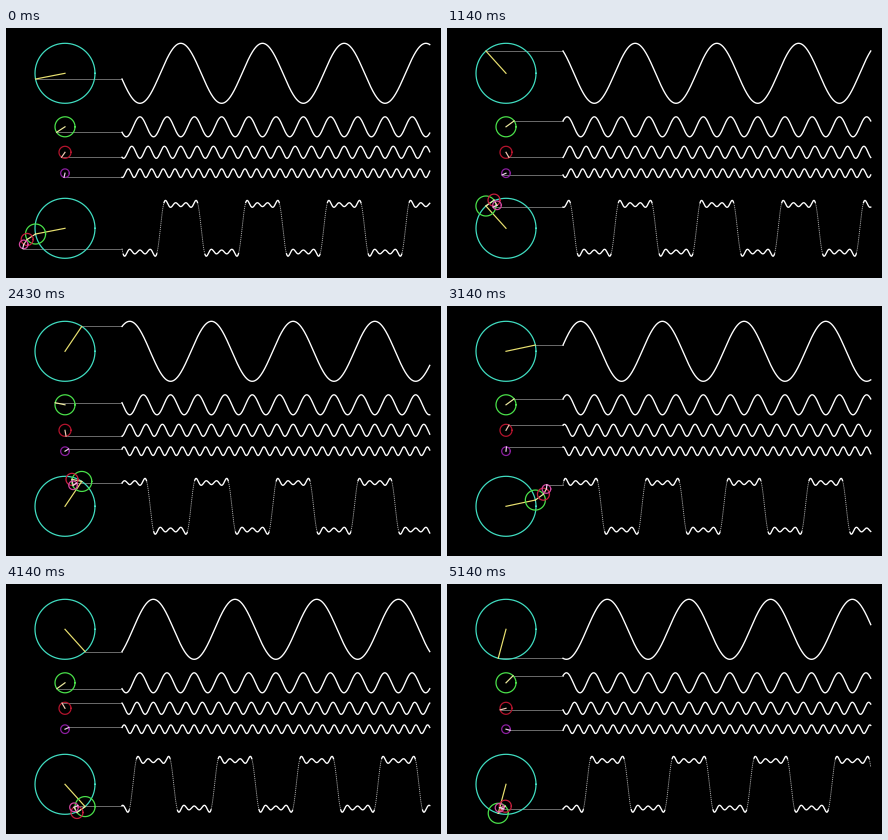
A matplotlib script that plays this animation: 435x250 px, repeating every 5280 ms.

```python
import numpy as np
import matplotlib.pyplot as plt
from matplotlib.animation import FuncAnimation

W, H, DPI = 435, 250, 64  # a power of two keeps the pixel size exact
LOOP_MS, TICK_MS = 5280, 10
PX = 72 / DPI

CX, X0, X1, PERIOD = 59, 116, 424, 81.7
SUM_Y = 200.3
ORDERS = np.array([1, 3, 5, 7])
RADII = 30 / ORDERS
ROWS = [45.3, 98.8, 124.3, 145.2]
RINGS = ["#40dcc0", "#4ae04a", "#b4142d", "#8c1ea0"]
SUM_RINGS = ["#40dcc0", "#4ae04a", "#c41e3c", "#d246a0"]
HANDS = ["#e8e070", "#eeeaa0", "#f0c8b4", "#f0d2f0"]

# phase in degrees at a few steps; the picture advances 7 times a second
STEPS = [0, 8, 12, 17, 22, 29, 36]
PHASES = [191, 132, 97, 56, 12, -48, -105]

fig = plt.figure(figsize=(W / DPI, H / DPI), dpi=DPI, facecolor="black")
ax = fig.add_axes([0, 0, 1, 1])
ax.set(xlim=(0, W), ylim=(H, 0))
ax.axis("off")

turn = np.linspace(0, 2 * np.pi, 73)
xs = np.arange(X0, X1, 0.25)
advance = 2 * np.pi * (xs - X0) / PERIOD


def line(color, width, **kw):
    return ax.plot([], [], color=color, lw=width * PX, **kw)[0]


def make_row(rings):
    link = line("#747474", 0.9)
    dials = [(line(c, 1.25), line(h, 1.2)) for c, h in rings]
    return link, dials, line("white", 1.35)


rows = [make_row([pair]) for pair in zip(RINGS, HANDS)]
total = make_row(list(zip(SUM_RINGS, HANDS)))
edges = line("#a0a0a0", 0.95, linestyle=(0, (1.3, 0.9)), dash_capstyle="butt")


def draw_dial(dial, x, y, r, angle):
    """Place a ring with its hand and return the tip."""
    ring, hand = dial
    ring.set_data(x + r * np.cos(turn), y + r * np.sin(turn))
    tip = x + r * np.cos(angle), y - r * np.sin(angle)
    hand.set_data([x, tip[0]], [y, tip[1]])
    return tip


def draw_link(link, tip):
    link.set_data([tip[0], X0], [tip[1], tip[1]])


def update(tick):
    step = (tick * TICK_MS + 5) * 7 // 1000
    phase = np.radians(np.interp(step, STEPS, PHASES))

    for (link, dials, wave), n, r, y in zip(rows, ORDERS, RADII, ROWS):
        draw_link(link, draw_dial(dials[0], CX, y, r, n * phase))
        wave.set_data(xs, y - r * np.sin(n * (phase + advance)))

    link, dials, wave = total
    tip = CX, SUM_Y
    for dial, n, r in zip(dials, ORDERS, RADII):
        tip = draw_dial(dial, *tip, r, n * phase)
    draw_link(link, tip)

    ys = SUM_Y - RADII @ np.sin(np.outer(ORDERS, phase + advance))
    steep = np.abs(np.gradient(ys, xs)) > 3.5
    wave.set_data(xs, np.where(steep, np.nan, ys))
    edges.set_data(xs, np.where(steep, ys, np.nan))
    return ax.lines


anim = FuncAnimation(fig, update, frames=LOOP_MS // TICK_MS, interval=TICK_MS,
                     repeat=True, repeat_delay=0, blit=False)
plt.show()
```
